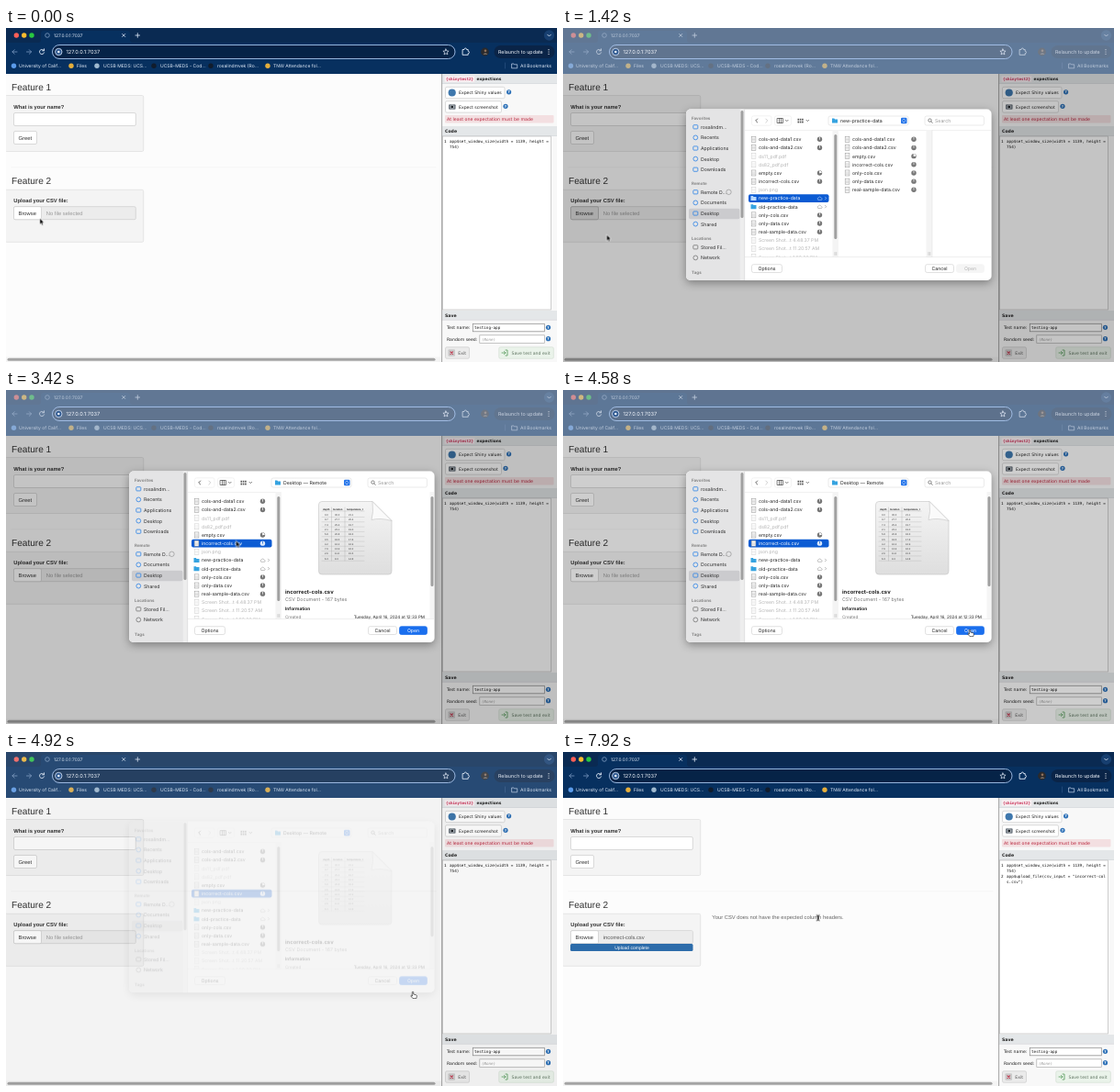
Write an HTML page that moves like this. It is 600 px wide and 364 px high and loops after 8000 ms.

```html
<!DOCTYPE html>
<html lang="en">
<head>
<meta charset="utf-8">
<title>Uploading a file while recording a test</title>
<style>
html, body { margin: 0; width: 100%; height: 100%; overflow: hidden; background: #fcfcfc; }
svg { display: block; width: 100vw; height: 100vh; text-rendering: geometricPrecision; }
text { white-space: pre; }
.web { font-family: "Liberation Sans", Arial, sans-serif; }
.ui { font-family: Inter, Roboto, sans-serif; }
.tool { font-family: "DejaVu Sans", sans-serif; }
.mono { font-family: "DejaVu Sans Mono", monospace; }
.b { font-weight: 700; }
.end { text-anchor: end; }
.mid { text-anchor: middle; }

#dim, #tint, #sheet, #slide, #cursor, #fill { animation: 8s linear infinite; }
#hover, #folderView, #fileView, #uploaded, #result, #arrow, #hand, #beam { animation: 8s step-end infinite; }
#dim { animation-name: dim; }
#tint { animation-name: tint; }
#sheet { animation-name: fade; }
#slide { animation-name: slide; }
#cursor { animation-name: travel; }
#fill { animation-name: fill; transform-origin: 8px 0; }
#hover { animation-name: hover; }
#folderView { animation-name: folderView; }
#fileView { animation-name: fileView; }
#uploaded { animation-name: uploaded; }
#result { animation-name: result; }
#arrow { animation-name: arrow; }
#hand { animation-name: hand; }
#beam { animation-name: beam; }

@keyframes dim { 0%, 6.25% { opacity: 0 } 13.5%, 56.25% { opacity: .23 } 62.5%, 100% { opacity: 0 } }
@keyframes tint { 0%, 6.25% { opacity: 0 } 13.5%, 57% { opacity: .56 } 64%, 100% { opacity: 0 } }
@keyframes fade { 0%, 7.5% { opacity: 0 } 10%, 60% { opacity: 1 } 61.9%, 100% { opacity: 0 } }
@keyframes slide {
  0%, 7.5% { transform: translateY(-29px); animation-timing-function: ease-in-out }
  13.5% { transform: none }
  57.5% { transform: none; animation-timing-function: ease-in }
  61.9%, 100% { transform: translateY(-15px) }
}
@keyframes travel {
  0%, .99% { transform: translate(36.8px, 207.5px) }
  1%, 2.1% { transform: translate(33px, 206px) }
  2.12%, 14.6% { transform: translate(29.8px, 205.3px) }
  17.75% { transform: translate(47.6px, 225.5px); animation-timing-function: ease-in-out }
  30.25%, 33.4% { transform: translate(252px, 161px) }
  37.5% { transform: translate(250.5px, 164.5px) }
  45.9% { transform: translate(250.5px, 164.5px); animation-timing-function: ease-in-out }
  55.25%, 66.6% { transform: translate(443px, 261px) }
  70% { transform: translate(439px, 258.7px) }
  77.1% { transform: translate(439px, 258.7px); animation-timing-function: ease-in-out }
  96.9%, 100% { transform: translate(277.7px, 180.7px) }
}
@keyframes fill { 0%, 67.5% { transform: scaleX(0) } 70%, 100% { transform: none } }
@keyframes hover { 0% { opacity: 0 } 1% { opacity: 1 } 25%, 100% { opacity: 0 } }
@keyframes folderView { 0% { opacity: 1 } 39.6%, 100% { opacity: 0 } }
@keyframes fileView { 0% { opacity: 0 } 39.6%, 100% { opacity: 1 } }
@keyframes uploaded { 0% { opacity: 0 } 67.5%, 100% { opacity: 1 } }
@keyframes result { 0% { opacity: 0 } 71%, 100% { opacity: 1 } }
@keyframes arrow { 0% { opacity: 1 } 53.75% { opacity: 0 } 65.6% { opacity: 1 } 94%, 100% { opacity: 0 } }
@keyframes hand { 0% { opacity: 0 } 53.75% { opacity: 1 } 65.6%, 100% { opacity: 0 } }
@keyframes beam { 0% { opacity: 0 } 94%, 100% { opacity: 1 } }
</style>
</head>
<body>
<svg id="stage" viewBox="0 0 600 364" preserveAspectRatio="none">
  <defs>
    <clipPath id="sheetClip"><rect x="134" y="88.5" width="332.5" height="186.5" rx="5"/></clipPath>
    <clipPath id="listClip"><rect x="198" y="111" width="268" height="138.5"/></clipPath>
    <linearGradient id="paper" x2="0" y2="1"><stop stop-color="#f4f4f4"/><stop offset="1" stop-color="#dedede"/></linearGradient>
    <filter id="shadow" x="-20%" y="-20%" width="140%" height="150%">
      <feDropShadow dx="0" dy="3" stdDeviation="5" flood-opacity=".35"/>
    </filter>
  </defs>
</svg>
<script>
const text = (x, y, s, size, fill = '#222', cls = 'ui', extra = '') =>
  `<text x="${x}" y="${y}" font-size="${size}" fill="${fill}" class="${cls}" ${extra}>${s}</text>`;
const rect = (x, y, w, h, fill, extra = '') =>
  `<rect x="${x}" y="${y}" width="${w}" height="${h}" fill="${fill}" ${extra}/>`;
const box = (x, y, w, h, fill, stroke, r = 1.5) =>
  rect(x, y, w, h, fill, `stroke="${stroke}" stroke-width=".7" rx="${r}"`);
const dot = (x, y, r, fill, extra = '') => `<circle cx="${x}" cy="${y}" r="${r}" fill="${fill}" ${extra}/>`;
const line = (d, stroke, w = .8, fill = 'none') =>
  `<path d="${d}" fill="${fill}" stroke="${stroke}" stroke-width="${w}" stroke-linecap="round" stroke-linejoin="round"/>`;
const group = (id, ...parts) => `<g id="${id}">${parts.join('')}</g>`;
const folder = (x, y, fill) => `<path d="M${x - 3} ${y - 2.4}h2.3l.8 .8h2.9v4.2h-6z" fill="${fill}"/>`;

function browserBar() {
  const pale = '#c6d6ee';
  const marks = [
    [8.5, 14, 'University of Calif...', '#5b9bea'], [71, 77, 'Files', '#e5ae3c'],
    [99, 106, 'UCSB MEDS: UCS...', '#9fb9cf'], [161, 168, 'UCSB-MEDS - Cod...', '#111c2c'],
    [223, 230, 'rosalindmvek (Ro...', '#111c2c'], [285, 291, 'TNW Attendance fol...', '#e5ae3c']];
  return [
    rect(0, 0, 600, 50, '#07305f'),
    rect(0, 0, 600, 16, '#0a2a52'),
    '<path d="M35 16q3 0 3-3V6q0-3 3-3h91q3 0 3 3v7q0 3 3 3z" fill="#07305f"/>',
    rect(50.5, 18.5, 438.5, 15, '#062347', 'rx="7.5"'),
    dot(11.3, 8, 2.7, '#ff5f57'), dot(19.7, 8, 2.7, '#febc2e'), dot(28, 8, 2.7, '#28c840'),
    dot(45, 8, 2.3, 'none', 'stroke="#7f9cc2" stroke-width=".8"'),
    text(52, 10, '127.0.0.1:7037', 4.9, '#e8f0fc'),
    line('M126.7 6.5l3 3m0-3l-3 3M141 8h4.6M143.3 5.7v4.6', '#e4edfa', .8),
    dot(591.5, 8, 5.7, '#173f70'), line('M589.7 7.2l1.8 1.8 1.8-1.8', '#e4edfa'),
    line('M12 26H7m2.2-2.3L6.9 26l2.3 2.3', '#7d9ac2'),
    line('M22.500 26h5m-2.200-2.300l2.300 2.300-2.300 2.300', '#7d9ac2'),
    line('M41.300 24.500a2.600 2.600 0 1 0 .3 2.300M41.500 22.800v2h-2', '#e4edfa', .9),
    line('M497.500 23.500h1.500q0-1.500 1.300-1.500t1.300 1.500h1.600v1.800q1.300 0 1.300 1.200t-1.300 1.200v1.600h-5.700z', '#e4edfa', .9),
    dot(521.5, 26, 4.4, '#2b2a2c'), dot(522, 24.8, 1.3, '#92745e'), '<path d="M519.5 29q2.500-4 5 0z" fill="#6d6660"/>',
    rect(531.5, 19, 66, 14, '#0a2447', 'rx="7"'),
    text(536, 28, 'Relaunch to update', 5.35, '#f4f8ff'),
    [23.7, 26, 28.3].map(y => dot(591, y, .6, '#fff')).join(''),
    ...marks.map(([ix, x, label, color]) => dot(ix, 41.2, 2.7, color) + text(x, 43.1, label, 5, '#e4edfa')),
    line('M543.500 38v6', '#33588a', .6),
    line('M551 39h2l.7 .8h3v4h-5.700z', pale, .7), text(560, 43.1, 'All Bookmarks', 5, '#e4edfa'),
    rect(0, 0, 600, 50, '#a7b5c8', 'id="tint" opacity="0"'),
    rect(50.5, 18.5, 438.5, 15, 'none', 'rx="7.5" stroke="#a9c5ed" stroke-width=".9"'),
    dot(57.3, 26, 3.7, '#2e588f', 'stroke="#dce8fa" stroke-width=".8"'), dot(57.3, 26, 1.3, '#e8f1ff'),
    text(65.5, 28, '127.0.0.1:7037', 5.7, '#f4f8ff'),
    line('M479 23l.9 2 2.200.2-1.700 1.500.5 2.200-1.900-1.200-1.900 1.200.5-2.200-1.700-1.500 2.200-.2z', '#e8f0fc', .7)
  ].join('');
}

function webPage() {
  const ink = '#333';
  const button = (x, y, w, label) => box(x, y, w, 14, '#fff', '#ccc') + text(x + 5, y + 9.3, label, 5.83, ink, 'web');
  return [
    rect(0, 50, 475, 314, '#fcfcfc'),
    text(6, 67.5, 'Feature 1', 10.1, ink, 'web'),
    box(-1, 73.5, 150.7, 61, '#f4f4f4', '#dfdfdf'),
    text(8.3, 88.2, 'What is your name?', 5.8, ink, 'web b'),
    box(8.5, 92.5, 132.8, 14, '#fff', '#ccc'),
    button(8.5, 112.5, 25, 'Greet'),
    line('M6 151.800H468', '#ececec', .6),
    text(6, 170, 'Feature 2', 10.1, ink, 'web'),
    box(-1, 176.3, 150.7, 57, '#f4f4f4', '#dfdfdf'),
    text(8.3, 190.2, 'Upload your CSV file:', 5.8, ink, 'web b'),
    box(8.5, 194.7, 132.8, 14, '#ececec', '#ccc'),
    text(43.7, 204, 'No file selected', 5.83, '#999', 'web'),
    button(8.5, 194.7, 30, 'Browse'),
    group('hover', box(8.5, 194.7, 30, 14, '#dedede', '#adadad'), text(13.5, 204, 'Browse', 5.83, ink, 'web')),
    group('uploaded',
      rect(39.2, 195.2, 101.5, 13, '#ececec'), text(43.7, 204, 'incorrect-cols.csv', 5.83, '#555', 'web'),
      rect(8, 209, 133.5, 8, '#f0f0f0', 'rx="1.500"'), rect(8, 209, 133.5, 8, '#2d6caa', 'id="fill" rx="1.500"')),
    rect(0, 358.5, 475, 5.5, '#f4f4f4'), rect(1.5, 359.8, 466, 3, '#a4a4a4', 'rx="1.500"')
  ].join('');
}

function recorderPanel() {
  const head = (y, h) => rect(475, y, 125, h, '#e4e7e9') + line(`M475 ${y + h}H600`, '#c9cdd0', .5);
  const help = (x, y) => dot(x, y, 2.6, '#2f72b8') + text(x, y + 1.5, '?', 4, '#fff', 'tool b mid');
  const label = (x, y, s, fill = '#222') => text(x, y, s, 4.65, fill, 'tool');
  const code = (y, s, x = 483) => text(x, y, s, 4.27, '#111', 'mono');
  return [
    rect(475, 50, 125, 314, '#f8f8f8'),
    head(50, 10.500),
    rect(477.5, 52, 33, 7, '#f6edf0', 'rx="1"'),
    text(479, 57.2, '{shinytest2}', 4.15, '#c7254e', 'mono b'), text(512.5, 57.2, 'expections', 4.4, '#222', 'tool b'),
    box(478.5, 64.3, 64.5, 12.4, '#fff', '#ccc'), dot(485.7, 70.5, 4.1, '#3f78ad'),
    label(493, 72.3, 'Expect Shiny values'), help(547.6, 69.8),
    box(478.5, 79.7, 61, 12.4, '#fff', '#ccc'),
    rect(482, 83.3, 7.600, 5.500, '#737b84', 'rx="1"'), dot(485.8, 86, 1.9, '#20252a', 'stroke="#dfe5ea" stroke-width=".7"'),
    label(493, 87.7, 'Expect screenshot'), help(544, 85.3),
    rect(478, 95, 118.5, 8.5, '#f3dfe1', 'rx="1"'), text(480, 101, 'At least one expectation must be made', 4.75, '#b8263d', 'tool'),
    head(107, 10.5), text(478, 114, 'Code', 4.65, '#222', 'tool b'),
    box(475.5, 118, 118, 189, '#fff', '#bbb', 0),
    code(124.5, '1', 477), code(124.5, 'app$set_window_size(width = 1139, height ='), code(130.5, '754)'),
    head(308, 10.3), text(478, 315, 'Save', 4.65, '#222', 'tool b'),
    label(480, 328.2, 'Test name:'), box(508.3, 322.3, 78, 8.5, '#fff', '#888', 0), code(328, 'testing-app', 510),
    help(590.5, 326.3),
    label(480, 340.6, 'Random seed:'), box(515.8, 334.8, 70.5, 8.5, '#fff', '#aaa', 0),
    text(518, 340.5, '(None)', 4.2, '#999', 'mono', 'font-style="italic"'), help(590.5, 338.7),
    box(478.5, 347.8, 26, 12.4, '#ebebeb', '#ccc'),
    rect(481.5, 350.3, 7.5, 7.500, '#c9c9c9', 'rx="1"'), line('M484 352.800l2.500 2.500m0-2.500l-2.500 2.500', '#c23149', 1.1), label(492.3, 355.8, 'Exit', '#555'),
    box(536.8, 347.8, 59.5, 12.4, '#eaf3ea', '#d3dfd3'),
    line('M544 351h2v6h-2M540 354h4m-1.500-1.500l1.500 1.500-1.500 1.500', '#65a36a', .9),
    label(550.5, 355.8, 'Save test and exit', '#5f7461'),
    group('result',
      code(136.5, '2', 477), code(136.5, 'app$upload_file(csv_input = "incorrect-col'), code(142.5, 's.csv")'),
      text(75, 214.9, 'Upload complete', 5, '#fff', 'web mid'),
      text(162.3, 182, 'Your CSV does not have the expected column headers.', 5.83, '#666', 'web')),
    line('M474.600 50V364', '#8d8d8d', .8)
  ].join('');
}

const rowY = i => 121.3 + 9.17 * i;

// One line of a file column: icon, name and sync state.
function fileRow(x, i, name, statusX, selected) {
  const y = rowY(i), isFolder = /practice/.test(name), faded = /pdf|png|Shot/.test(name);
  const ink = selected ? '#fff' : faded ? '#b4b4b4' : '#262626', soft = selected ? '#cfe0fb' : '#888';
  let status = '';
  if (isFolder) status = line(`M${statusX - 2} ${y + 1.500}q-1.200-1.800 .7-2.200q1.700-2 3 .3q1.900 .4 .7 1.900z`, soft, .5)
    + (statusX < 300 ? line(`M${statusX + 6} ${y - 1.300}l1.200 1.300-1.200 1.300`, soft, .6) : '');
  else if (!faded) status = dot(statusX, y, 2.7, selected ? '#dbe7fb' : '#777')
    + line(`M${statusX} ${y}v-2.200`, selected ? '#0a5bd0' : '#fff', .7)
    + (name === 'empty.csv' ? `<path d="M${statusX} ${y}v-2.300a2.300 2.300 0 0 1 2.300 2.300z" fill="#fff"/>` : '');
  const icon = isFolder ? folder(x - 5.5, y, selected ? '#b9d9ff' : '#36a3e0')
    : rect(x - 7.8, y - 3, 4.7, 6, '#fff', `stroke="${faded ? '#ccc' : '#909090'}" stroke-width=".5"`)
      + line(`M${x - 6.800} ${y - 1}h2.700m-2.700 1.200h2.700m-2.700 1.200h2.700`, faded ? '#ddd' : '#aaa', .4);
  return (selected ? rect(202, y - 4.300, 87.5, 8.700, '#0b5bd3', 'rx="2"') : '')
    + icon + text(x, y + 1.9, name, 5.15, ink) + status;
}

function preview() {
  const rows = Array.from({ length: 10 }, (_, i) => {
    const y = 137 + i * 5.3, depth = ((i * 37) % 90 / 10).toFixed(1);
    return line(`M344 ${y + 1.500}h46`, '#999', .25)
      + text(347, y, depth, 2.7, '#333', 'web') + text(358, y, (30 - i * 2.3).toFixed(1), 2.7, '#333', 'web')
      + text(373, y, (21.1 - i * .7).toFixed(1), 2.7, '#333', 'web');
  }).join('');
  return [
    rect(300, 111, 166, 138.5, '#fff'),
    '<path d="M344 121.500h55l21 21v55q0 3.500-3.500 3.500h-72.500q-3.500 0-3.500-3.500v-72.500q0-3.500 3.500-3.500z" fill="url(#paper)" stroke="#c4c4c4" stroke-width=".6"/>',
    '<path d="M399 121.500q1.500 12-1 20 9-2.500 22 1z" fill="#fafafa" stroke="#bbb" stroke-width=".5"/>',
    text(345, 130.5, 'depth', 2.7, '#222', 'web b'), text(356, 130.5, 'location', 2.7, '#222', 'web b'),
    text(371, 130.5, 'temperature_t', 2.7, '#222', 'web b'), line('M344 132h46M354.500 128v58M369 128v58', '#999', .3), rows,
    text(304, 221.5, 'incorrect-cols.csv', 5.85, '#1d1d1d', 'ui b'),
    text(304, 230.2, 'CSV Document - 167 bytes', 5.3, '#777'),
    text(304, 240, 'Information', 4.8, '#222', 'ui b'),
    text(304, 249, 'Created', 4.6, '#777'), text(456, 249, 'Tuesday, April 16, 2024 at 12:33 PM', 4.6, '#222', 'ui end'),
    rect(461.5, 111, 5, 138, '#f5f5f5'), rect(462.5, 116, 3, 98, '#a0a0a0', 'rx="1.500"')
  ].join('');
}

function fileSheet() {
  const sections = [
    [100, 'Favorites', ['rosalindm...', 'Recents', 'Applications', 'Desktop', 'Downloads']],
    [171, 'Remote', ['Remote D...', 'Documents', 'Desktop', 'Shared']],
    [231, 'Locations', ['Stored Fil...', 'Network']],
    [268, 'Tags', []]];
  const sidebar = sections.map(([y, title, items]) => text(140, y, title, 4.5, '#858585', 'ui b')
    + items.map((name, i) => {
      const by = y + 9.7 + 11.6 * i, blue = y < 220 ? '#2c83e6' : '#777';
      const icon = i % 2 ? dot(144.3, by - 1.9, 2.4, 'none', `stroke="${blue}" stroke-width=".8"`)
        : rect(141.800, by - 4, 5, 4.2, 'none', `rx=".8" stroke="${blue}" stroke-width=".8"`);
      return icon + text(150, by, name, 5.2, '#2c2c2c');
    }).join('')).join('');
  const names = ['cols-and-data1.csv', 'cols-and-data2.csv', 'ds11_pdf.pdf', 'ds82_pdf.pdf', 'empty.csv',
    'incorrect-cols.csv', 'json.png', 'new-practice-data', 'old-practice-data', 'only-cols.csv', 'only-data.csv',
    'real-sample-data.csv', 'Screen Shot...t 4.48.37 PM', 'Screen Shot...t 11.20.57 AM', 'Screen Shot...t 1.50.39 PM'];
  const inner = names.filter(n => n.endsWith('.csv'));
  const path = name => text(302, 103, name, 5.2, '#222');
  const button = (x, w, label, fill, ink) => box(x, 257.7, w, 8.800, fill, fill === '#fff' ? '#d4d4d4' : fill, 2)
    + text(x + w / 2, 264, label, 5.2, ink, 'ui mid');
  const thumb = (x, y, h) => rect(x, y, 3, h, '#a0a0a0', 'rx="1.500"');
  const grip = x => line(`M${x} 244.500v3m1.700-3v3`, '#aaa', .5);

  return group('sheet', group('slide',
    rect(134, 88.5, 332.5, 186.5, '#fff', 'rx="5" filter="url(#shadow)"'),
    '<g clip-path="url(#sheetClip)">',
    rect(134, 88, 63.5, 188, '#e4e4e5'), rect(137, 196.800, 55.500, 11.4, '#cbcbce', 'rx="2"'),
    sidebar, dot(180.5, 178.8, 2.7, 'none', 'stroke="#888" stroke-width=".6"'),
    rect(192.8, 88, 4.7, 188, '#eee'), thumb(193.5, 90, 117), line('M197.700 88V275', '#d0d0d0', .5),
    box(205.5, 95.8, 21.5, 10.4, '#fff', '#eee', 2), line('M211.700 99l-2 2 2 2', '#444'), line('M220.800 99l2 2-2 2', '#c5c5c5'),
    box(230.5, 95.8, 18, 10.4, '#fff', '#eee', 2), line('M233.500 98.500h6v5h-6zm2 0v5m2-5v5', '#444', .7),
    line('M242.500 100.300l1.300 1.300 1.300-1.300M265 100.300l1.300 1.300 1.300-1.300', '#444', .7),
    ...[0, 1, 2, 3, 4, 5].map(i => rect(255.5 + i % 3 * 2.3, i < 3 ? 98.8 : 101.6, 1.6, 1.8, '#555')),
    box(289, 96, 87, 10, '#fff', '#e0e0e0', 2), folder(296, 101, '#36a3e0'),
    rect(368, 97.7, 6.5, 6.6, '#2575ea', 'rx="1.300"'), line('M370 100.300l1.200-1.200 1.200 1.200m0 1.500l-1.200 1.200-1.200-1.200', '#fff', .6),
    box(394, 96, 64.5, 10, '#fff', '#e2e2e2', 2), dot(399.5, 100.6, 1.7, 'none', 'stroke="#555" stroke-width=".7"'), line('M400.800 101.900l1.500 1.500', '#555', .7),
    text(405, 103, 'Search', 5.2, '#999'),
    '<g clip-path="url(#listClip)">',
    line('M198 111.500H467', '#e2e2e2', .5),
    ...names.map((n, i) => fileRow(213, i, n, 279.5)),
    rect(293.5, 111, 6.5, 139, '#f4f4f4'), thumb(295.3, 116, 114), grip(296),
    group('folderView', fileRow(213, 7, names[7], 279.5, true),
      ...inner.map((n, i) => fileRow(315, i, n, 382)),
      rect(395.5, 111, 6.5, 139, '#f4f4f4'), line('M402 111V250', '#dcdcdc', .5), grip(398)),
    group('fileView', fileRow(213, 5, names[5], 279.5, true), preview()),
    '</g>',
    line('M198 249.500H467', '#dedede', .5),
    button(205.5, 33, 'Options', '#fff', '#222'), button(394.5, 31, 'Cancel', '#fff', '#222'), button(428.5, 30, 'Open', '#f5f5f5', '#b5b5b5'),
    '</g>',
    // The popup label and the default button follow the selection.
    `<g style="animation:folderView 8s step-end infinite">${path('new-practice-data')}</g>`,
    `<g style="animation:fileView 8s step-end infinite">${path('Desktop — Remote')}${button(428.5, 30, 'Open', '#1a6fee', '#fff')}</g>`
  ));
}

function pointer() {
  return group('cursor',
    group('arrow', line('M0 0v6.600l1.500-1.400 1 2.300 1.200-.5-1-2.300h2z', '#fff', .6, '#000')),
    group('hand', line('M-.7 4.500v-4q.7-1 1.400 0v2.500l3 .8q.8 .4 .6 1.500l-.5 2.300h-3.800l-2.200-2.800q.2-1 1.500-.3z', '#111', .6, '#fff')),
    group('beam', line('M-1.500-3q1.500 0 1.500 1v4q0 1-1.500 1M1.500-3q-1.500 0-1.500 1v4q0 1 1.500 1', '#111', .8)));
}

document.getElementById('stage').insertAdjacentHTML('beforeend',
  webPage() + recorderPanel() + browserBar()
  + rect(0, 50, 600, 314, '#000', 'id="dim" opacity="0"') + fileSheet() + pointer());
</script>
</body>
</html>
```
